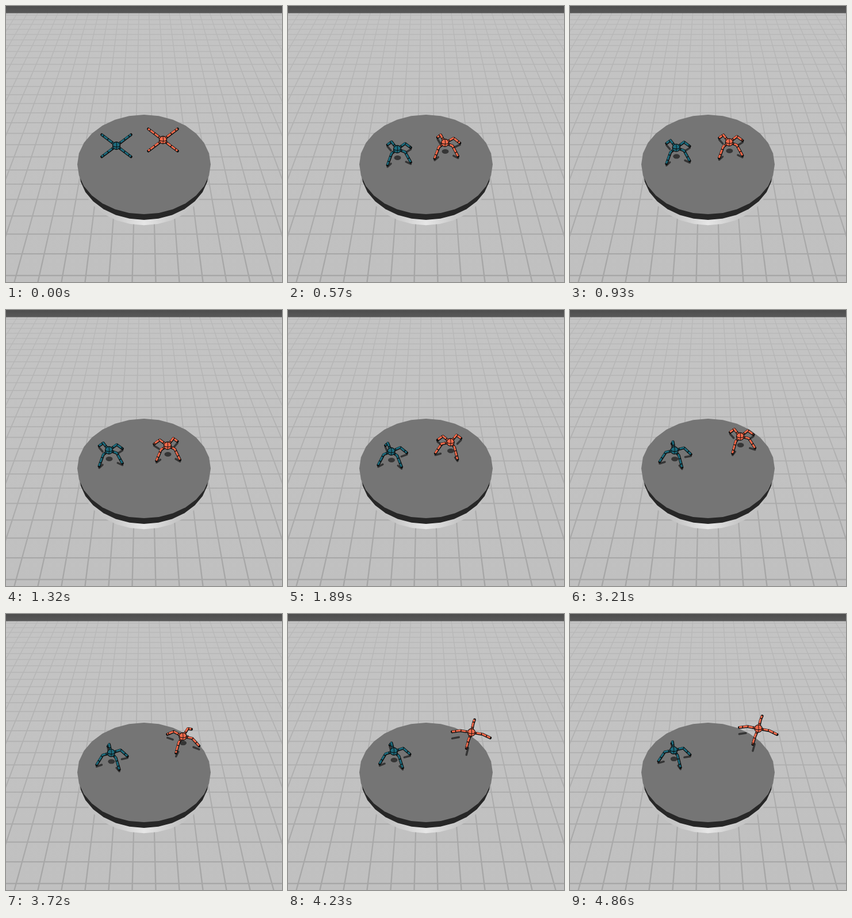
Recreate the animation shown at these times as an HTML page with a canvas. Size 480 px wide and 480 px high, loop 4890 ms.

```html
<!DOCTYPE html>
<html lang="en">
<head>
<meta charset="utf-8">
<title>Two walkers on a disk</title>
<style>
html, body { margin: 0; width: 100%; height: 100%; overflow: hidden; background: #c2c2c2; }
canvas { position: absolute; left: 0; top: 0; width: 480px; height: 480px; }
</style>
</head>
<body>
<canvas id="floor" width="480" height="480"></canvas>
<canvas id="stage" width="480" height="480"></canvas>
<script>
const LOOP = 4890, STEP = 30, RAD = Math.PI / 180;
const TILT = 0.75; // ground foreshortening
const INK = '#0c0c0c', SHADE = '#353535';

const ease = u => {
  u = Math.min(1, Math.max(0, u));
  return u * u * (3 - 2 * u);
};

// Path points: time, x, y, turn in degrees. Standing runs from 0 (legs flat) to 1.
const ants = [
  {
    color: '#1c6a7c',
    path: [[0, 192, 243, 0], [570, 190, 249, 0], [1320, 179, 244, 0],
      [2460, 180, 248, 31], [4230, 184, 239, 22], [LOOP, 180, 237, 30]],
    stand: t => ease(t / 450),
    swing: () => 13
  },
  {
    color: '#f46a4b',
    path: [[0, 273, 233, 0], [570, 273, 238, 6], [1320, 281, 236, -6], [2460, 284, 224, 20],
      [3210, 296, 220, -5], [4230, 319, 206, -33], [LOOP, 328, 199, -31]],
    stand: t => ease(t / 450) - 0.7 * ease((t - 3400) / 800),
    swing: t => 18 * Math.cos((t - 570) / 420)
  }
];

const floor = document.getElementById('floor').getContext('2d');
const stage = document.getElementById('stage').getContext('2d');

// Outline of a 28-sided disk rim.
function rim(cy, rx, ry) {
  const path = new Path2D();
  for (let i = 0; i < 28; i++) {
    const a = i * Math.PI / 14;
    path.lineTo(240 + rx * Math.sin(a), cy - ry * Math.cos(a));
  }
  path.closePath();
  return path;
}
const diskTop = rim(275.6, 116, 86.5);

function gradient(c, x0, y0, x1, y1, ...stops) {
  const g = c.createLinearGradient(x0, y0, x1, y1);
  stops.forEach((s, i) => g.addColorStop(i / (stops.length - 1), s));
  return g;
}

function drawFloor(c) {
  const horizon = -340;
  c.fillStyle = gradient(c, 0, 12, 0, 480, '#c4c4c4', '#c0c0c0');
  c.fillRect(0, 0, 480, 480);

  c.fillStyle = gradient(c, 0, 12, 0, 480, '#b9b9b9', '#afafaf', '#a5a5a5');
  for (let k = -4; k < 25; k++) {
    const y = 1 / (0.001418 + k * 0.0000605) + horizon;
    const h = 1.3 + y / 480;
    c.fillRect(0, y - h / 2, 480, h);
  }
  for (let k = -14; k < 14; k++) {
    const far = 240 + (k + 0.5) * 17.6, near = 240 + (k + 0.5) * 41;
    c.beginPath();
    c.moveTo(far - 0.7, 12);
    c.lineTo(far + 0.7, 12);
    c.lineTo(near + 1.2, 480);
    c.lineTo(near - 1.2, 480);
    c.fill();
  }

  c.fillStyle = gradient(c, 0, 0, 0, 13, '#4d4d4d', '#595959');
  c.fillRect(0, 0, 480, 12.5);

  c.fillStyle = gradient(c, 128, 0, 352, 0, '#bebebe', '#c6c6c6', '#e6e6e6', '#c6c6c6', '#bebebe');
  c.fill(rim(298, 109, 83.2));
  c.fillStyle = '#272727';
  c.fill(rim(286.6, 113, 85.4));
  c.fillStyle = '#757575';
  c.fill(diskTop);
}

// Linear walk along the path points.
function along(path, t) {
  const i = path.findIndex(p => p[0] > t);
  const a = path[i - 1], b = path[i];
  const u = (t - a[0]) / (b[0] - a[0]);
  return a.map((v, j) => v + (b[j] - v) * u);
}

function poseAt(ant, t) {
  const [, x, y, turn] = along(ant.path, t);
  const stand = ant.stand(t);
  const reach = 36 - 7 * stand;
  const legs = [0, 1, 2, 3].map(k => {
    const swing = ant.swing(t) * stand * Math.cos((k * 90 - 45) * RAD);
    const a = (225 + k * 90 + turn + swing) * RAD;
    const joint = (r, drop) => [x + r * Math.cos(a), y + r * TILT * Math.sin(a) + drop];
    return [[x, y], joint(reach * 0.58, -2.5 * stand), joint(reach, 10 * stand)];
  });
  legs.sort((p, q) => p[2][1] - q[2][1]);
  return { x, y, stand, legs, airborne: t > 3400 && stand < 1 };
}

function line(c, pts, color, width, dash = []) {
  c.strokeStyle = color;
  c.lineWidth = width;
  c.setLineDash(dash);
  c.beginPath();
  pts.forEach(p => c.lineTo(...p));
  c.stroke();
}

function drawShadow(c, { x, y, stand, legs, airborne }) {
  const drop = 15 * stand;
  const footDrop = airborne ? 3 + 12 * (1 - stand) : 3 * stand;
  c.save();
  c.clip(diskTop);
  c.fillStyle = SHADE;
  c.beginPath();
  c.ellipse(x + 0.5, y + drop, 6, 4, 0, 0, 7);
  c.fill();
  for (const [, , [fx, fy]] of legs) {
    const sy = y + drop, ey = fy + footDrop;
    line(c, [[x + (fx - x) * 0.65, sy + (ey - sy) * 0.65], [fx, ey]], SHADE, 3.5);
  }
  c.restore();
}

function drawLeg(c, pts, color) {
  line(c, pts, INK, 4.8);
  c.lineCap = 'butt';
  line(c, pts.map(([x, y]) => [x - 0.3, y - 0.4]), color, 3, [8, 1.4]);
  c.lineCap = 'round';
}

function drawAnt(c, color, { x, y, legs }) {
  legs.forEach(pts => drawLeg(c, pts, color));
  c.fillStyle = color;
  c.strokeStyle = INK;
  c.lineWidth = 1.1;
  c.setLineDash([]);
  c.beginPath();
  c.arc(x, y, 6.6, 0, 7);
  c.fill();
  c.stroke();
  c.beginPath();
  c.ellipse(x, y - 1, 6.4, 3, 0, 0.1, 3.04);
  c.stroke();
  line(c, [[x, y - 6], [x + 0.6, y], [x, y + 6]], INK, 0.9);
}

function frame(now) {
  const t = Math.floor(Math.max(0, now - start) % LOOP / STEP) * STEP;
  const poses = ants.map(a => poseAt(a, t));
  stage.clearRect(0, 0, 480, 480);
  stage.lineCap = stage.lineJoin = 'round';
  poses.forEach(p => drawShadow(stage, p));
  poses.forEach((p, i) => drawAnt(stage, ants[i].color, p));
  requestAnimationFrame(frame);
}

drawFloor(floor);
const start = performance.now();
frame(start);
</script>
</body>
</html>
```
